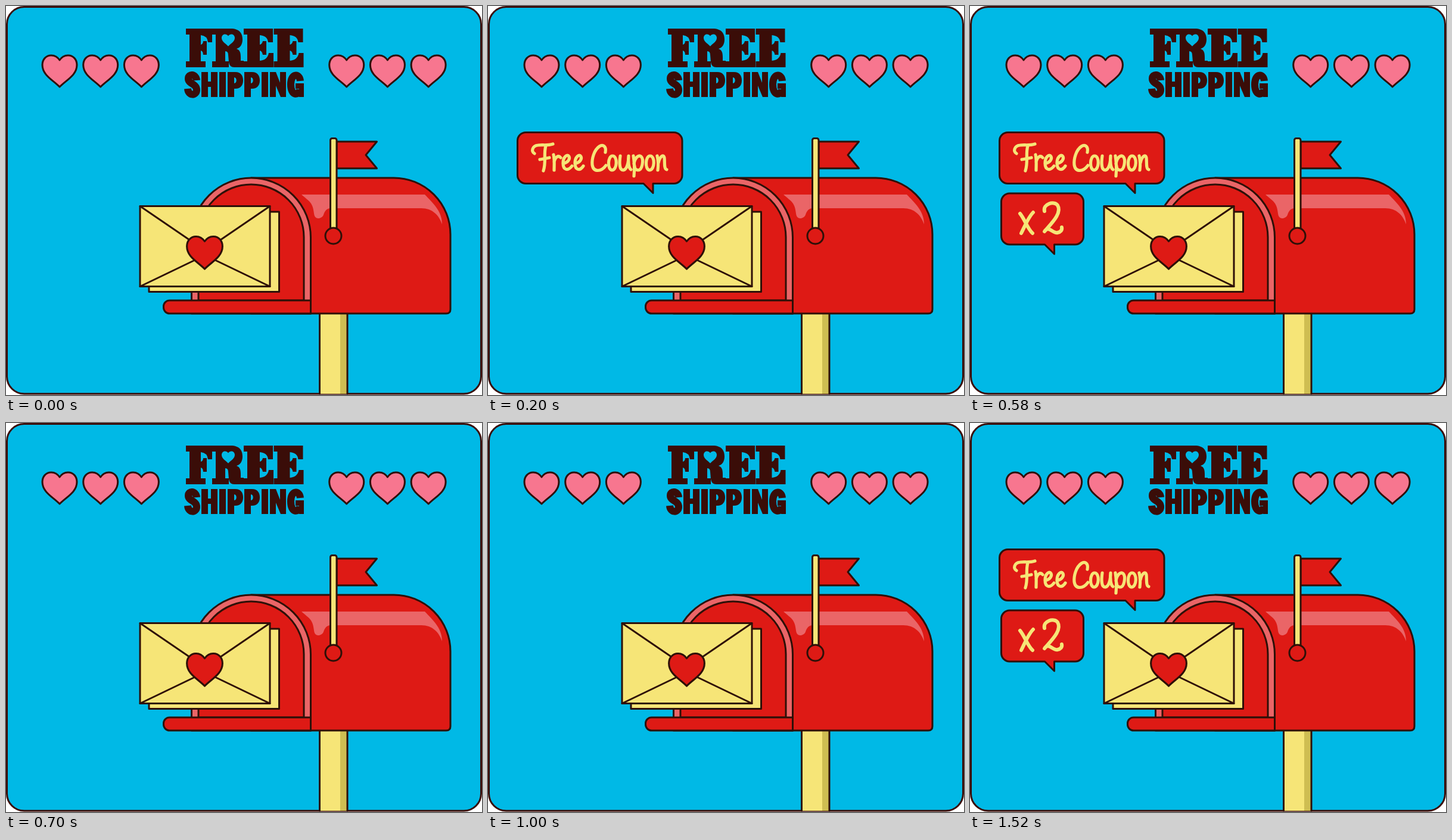
Animation of 799 by 654 pixels, one loop 1800 ms. Source, as an HTML page with a canvas:

```html
<!DOCTYPE html>
<html lang="en">
<head>
<meta charset="utf-8">
<title>Free Shipping</title>
<style>
  html, body { margin: 0; width: 100%; height: 100%; overflow: hidden; background: #fff; }
  canvas { display: block; }
</style>
</head>
<body>
<canvas id="stage" width="799" height="654" role="img" aria-label="Free Shipping. Free Coupon x 2"></canvas>
<script>
const ctx = document.getElementById('stage').getContext('2d');
const LOOP = 1800;
const BLUE = '#00b9e6', RED = '#de1a15', YELLOW = '#f6e577', PINK = '#f7768f',
      ROSE = '#ea6567', SHADE = '#cfbe52', INK = '#2e1008', BROWN = '#3a0d08';

const HEART = 'M0 8C-4 2-9 0-14 0C-23 0-29 7-29 16C-29 33-12 41 0 53C12 41 29 33 29 16C29 7 23 0 14 0C9 0 4 2 0 8Z';

// Slab and condensed capitals, top left at the origin
const SLAB = {
  F: 'M0 0H44V23H37Q36 12 25 11V27Q29 26 29 21H35V44H29Q29 38 25 37V55H33V65H0V55H6V10H0Z',
  R: 'M0 0H31C46 0 51 8 51 18C51 27 47 32 41 34C47 36 48 41 48 48V54H53V65H37Q29 65 28 56L27 44Q27 38 22 38V55H28V65H0V55H6V10H0Z',
  E: 'M0 0H49V23H41Q40 12 27 11V27Q31 26 32 21H38V44H32Q31 38 27 37V54Q40 53 42 41H50V65H0V55H6V10H0Z'
};
const BOLD = {
  H: 'M0 0h11v16h5v-16h11v42h-11v-17h-5v17h-11z',
  I: 'M0 0h11v42h-11z',
  P: 'M0 0h13c9 0 13 6 13 14s-4 14-13 14h-2v14h-11zM11 9v10c5 0 5-10 0-10z',
  N: 'M0 0h10l7 18v-18h10v42h-9l-8-19v19h-10z'
};

const FREE_COUPON = [
  'M78 248C72 245 74 235 84 234C92 233 100 235 109 232M97 235C93 249 98 262 93 277M87 258C93 257 98 256 103 255',
  'M110 250C112 259 111 268 111 276M111 262C113 254 118 250 122 255',
  'M126 265C134 263 138 258 136 253C133 248 126 254 126 264C126 276 134 278 141 269',
  'M146 265C154 263 158 258 156 253C153 248 146 254 146 264C146 276 154 278 160 269',
  'M197 246C199 236 193 232 187 236C178 242 174 257 175 267C177 280 190 279 198 268',
  'M209 252C201 252 200 275 208 276C217 276 218 252 209 252Z',
  'M222 252C220 266 221 276 227 276C233 275 236 264 236 252C235 262 236 272 240 275',
  'M244 252C246 264 246 275 245 286M245 265C247 254 253 250 257 253C262 258 259 276 252 276C248 276 246 273 246 269',
  'M272 252C264 252 263 275 271 276C280 276 281 252 272 252Z',
  'M284 252C286 260 286 268 285 276M286 264C288 254 294 248 296 255C297 262 295 274 300 275'
];
const TIMES_TWO = [
  'M84 349C91 357 97 375 105 382M106 347C98 355 92 370 86 382',
  'M125 345C122 333 141 327 147 335C155 348 137 365 125 379C132 368 139 383 147 381C152 380 155 377 154 372'
];

function shape(d, fill, stroke, width = 3) {
  const path = typeof d === 'string' ? new Path2D(d) : d;
  if (fill) {
    ctx.fillStyle = fill;
    ctx.fill(path, 'evenodd');
  }
  if (stroke) {
    ctx.strokeStyle = stroke;
    ctx.lineWidth = width;
    ctx.stroke(path);
  }
}

function box(x, y, w, h, radii, fill, stroke) {
  const path = new Path2D();
  path.roundRect(x, y, w, h, radii);
  shape(path, fill, stroke);
}

function at(x, y, scale, draw) {
  ctx.save();
  ctx.translate(x, y);
  ctx.scale(scale, scale);
  draw();
  ctx.restore();
}

function heart(x, y, scale, fill, stroke) {
  at(x, y, scale, () => shape(HEART, fill, stroke));
}

function letters(font, y, places) {
  for (const [char, x] of places) at(x, y, 1, () => shape(font[char], BROWN));
}

function title() {
  letters(SLAB, 38, [['F', 302], ['R', 346], ['E', 399], ['E', 449.5]]);
  heart(373, 47.5, 0.38, BLUE);
  letters(BOLD, 111, [['H', 328], ['I', 358], ['P', 372], ['P', 400], ['I', 429], ['N', 443]]);
  ctx.lineCap = 'butt';
  shape('M320 125C319 114 306 113 306 122C306 132 320 130 320 141C320 151 306 152 305 139', null, BROWN, 12);
  shape('M494 126C493 113 478 112 478 132C478 152 492 151 493 140', null, BROWN, 12);
  shape('M486 130H500V153H492V139H486Z', BROWN);
  ctx.lineCap = 'round';
}

function mailbox() {
  shape('M526.5 517H573V652H526.5Z', YELLOW);
  shape('M561 517H573V652H561Z', SHADE);
  shape('M526.5 517V652M573 517V652', null, INK);

  shape('M411.5 289H651A95 95 0 0 1 746 384V510Q746 517 739 517H411.5Z', RED, INK);
  shape('M496 317H703C716 331 732 344 732 367C727 352 716 340 697 340H545C538 340 535 345 533 351' +
        'C531 357 521 360 518 353C516 347 517 340 512 332C508 326 501 322 496 317Z', ROSE);
  shape('M311.5 517V389A100 100 0 0 1 511.5 389V517Z', ROSE, INK);
  shape('M323 495V388.5A88.5 88.5 0 0 1 500 388.5V495Z', RED, INK);
  box(264.5, 495, 247, 22, [10, 0, 0, 10], RED, INK);

  shape('M555 228H622.5L604 250.5L622.5 273H555Z', RED, INK);
  box(544.5, 222.5, 10.5, 156, [3, 3, 0, 0], YELLOW, INK);
  box(536, 373, 27, 27, 13.5, RED, INK);
}

function envelopes() {
  shape('M240 346H458.5V480.5H240Z', YELLOW, INK);
  shape('M225 336.5H443V471.5H225Z', YELLOW, INK);
  shape('M225 336.5L334 411L443 336.5M225 471.5L334 419L443 471.5', null, INK);
  heart(333.5, 387.5, 1.03, RED, INK);
}

function bubble(x, y, w, tail) {
  const h = 86, r = 14;
  const path = new Path2D();
  path.moveTo(x + r, y);
  path.arcTo(x + w, y, x + w, y + h, r);
  path.arcTo(x + w, y + h, x, y + h, r);
  path.lineTo(tail, y + h);
  path.lineTo(tail, y + h + 16);
  path.lineTo(tail - 16, y + h);
  path.arcTo(x, y + h, x, y, r);
  path.arcTo(x, y, x + w, y, r);
  path.closePath();
  shape(path, RED, INK);
}

function script(strokes, width) {
  for (const d of strokes) shape(d, null, YELLOW, width);
}

function render(t) {
  ctx.clearRect(0, 0, 799, 654);
  ctx.lineJoin = ctx.lineCap = 'round';
  box(1.5, 1.5, 796, 650.5, 29, BLUE, BROWN);
  for (const x of [90, 158.7, 227.4, 571.7, 640.4, 709.1]) heart(x, 83, 1, PINK, INK);
  title();
  mailbox();
  envelopes();

  const blink = (t >= 700 && t < 800) || (t >= 1000 && t < 1100);
  if (t >= 200 && !blink) {
    bubble(49.5, 212.5, 276.5, 277);
    script(FREE_COUPON, 5.2);
  }
  if (t >= 400 && !blink) {
    bubble(52.5, 315, 138, 141.5);
    script(TIMES_TWO, 6);
  }
}

const start = performance.now();
function tick() {
  render((performance.now() - start) % LOOP);
  requestAnimationFrame(tick);
}
tick();
</script>
</body>
</html>
```
